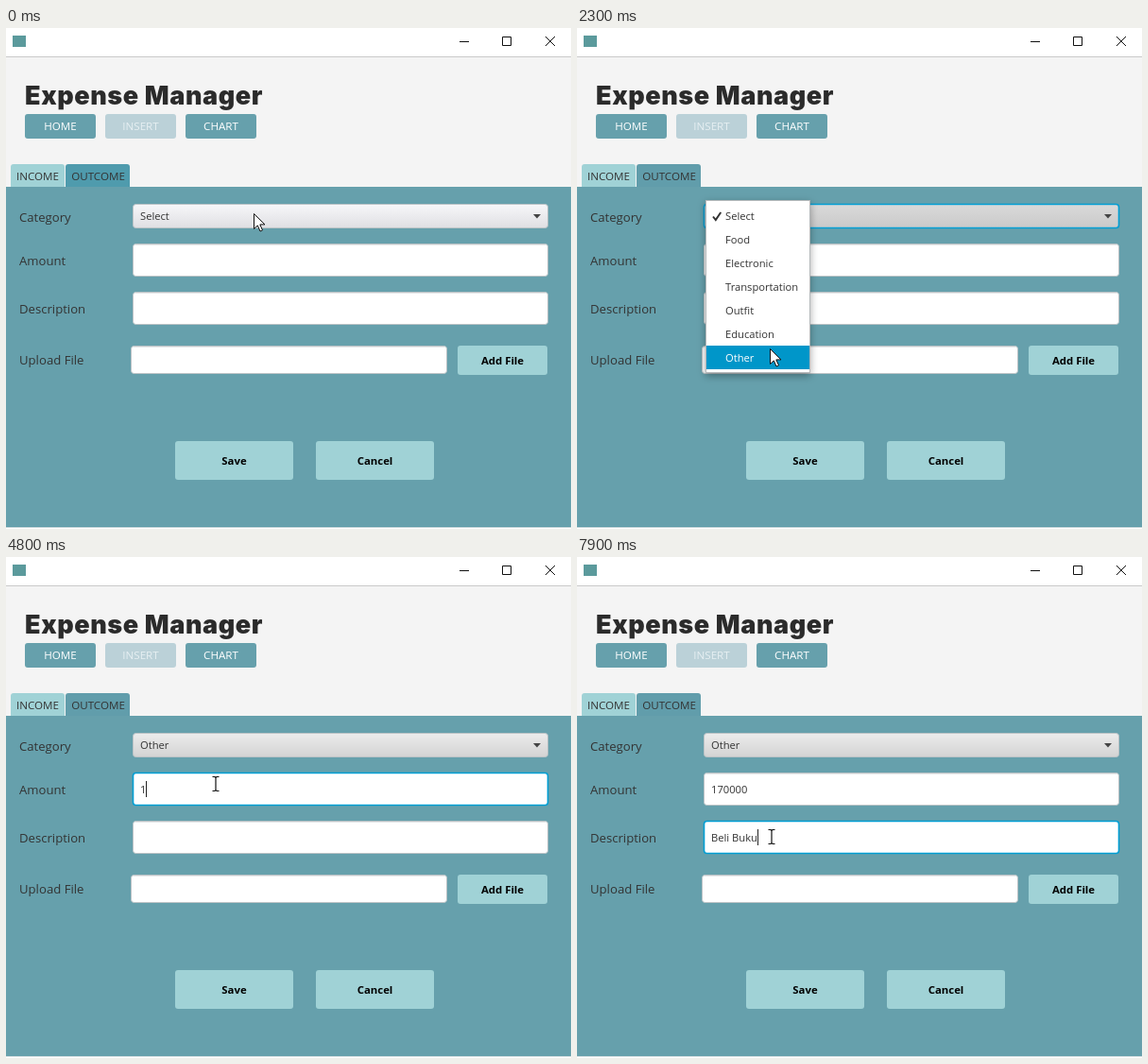
An HTML page for the animation above (8 s loop, 598 px wide and 530 px high).

```html
<!DOCTYPE html>
<html lang="en">
<head>
<meta charset="utf-8">
<title>Expense Manager</title>
<style>
  html, body { margin: 0; width: 100%; height: 100%; overflow: hidden; background: #fff; }
  svg { display: block; width: 598px; height: 530px; font-family: "Open Sans", "Noto Sans", sans-serif; fill: #333; }
  text { white-space: pre; }
  .title { font: 900 27px Inter, "Open Sans", sans-serif; font-optical-sizing: none; letter-spacing: .6px; fill: #2b2b2b; }
  .label { font-size: 13.15px; }
  .value { font-size: 11.2px; }
  .nav { font-size: 11.6px; }
  .action { font-size: 11.4px; font-weight: 700; fill: #000; }
  .mid { text-anchor: middle; }
</style>
</head>
<body>
<svg id="stage" viewBox="0 0 598 530">
  <defs>
    <linearGradient id="idle" x2="0" y2="1"><stop stop-color="#ececec"/><stop offset="1" stop-color="#d3d3d3"/></linearGradient>
    <linearGradient id="hover" x2="0" y2="1"><stop stop-color="#f7f7f9"/><stop offset="1" stop-color="#dfdfe3"/></linearGradient>
    <linearGradient id="pressed" x2="0" y2="1"><stop stop-color="#dadada"/><stop offset="1" stop-color="#c9c9c9"/></linearGradient>
    <filter id="shadow" x="-20%" y="-20%" width="140%" height="140%">
      <feDropShadow dx="0" dy="3" stdDeviation="4" flood-color="#000" flood-opacity=".35"/>
    </filter>
  </defs>
</svg>
<script>
const LOOP = 8000, STEP = 100;
const TEAL = '#66a0ac', PALE = '#a0d2d6', BLUE = '#0096c9', FOCUS = '#039ed3', EDGE = '#bcc3c6';
const CLICK = { open: 300, pick: 3500, amount: 4300, description: 6400 };
const OPTIONS = ['Select', 'Food', 'Electronic', 'Transportation', 'Outfit', 'Education', 'Other'];
const ROW_TOP = 186, ROW_HEIGHT = 25;

// Pointer stops: time, x, y
const POINTER = [
  [0, 262, 196], [700, 262, 196], [1500, 196, 344], [2000, 196, 344],
  [2800, 220, 328], [3000, 220, 328], [3400, 214, 346], [3600, 214, 346],
  [4000, 227, 250], [4400, 227, 250], [4700, 222, 240], [5700, 222, 240],
  [6300, 206, 296], [LOOP, 206, 296]
];

const stage = document.getElementById('stage');

function add(tag, attrs, parent = stage, content = '') {
  const node = document.createElementNS('http://www.w3.org/2000/svg', tag);
  set(node, attrs);
  node.textContent = content;
  return parent.appendChild(node);
}
function set(node, attrs) {
  for (const key in attrs) node.setAttribute(key, attrs[key]);
}
function show(node, visible) {
  node.setAttribute('visibility', visible ? 'visible' : 'hidden');
}
const box = (x, y, width, height, fill, rx = 0, parent = stage) =>
  add('rect', { x, y, width, height, fill, rx }, parent);
const line = (d, stroke, width = 1, parent = stage) =>
  add('path', { d, stroke, fill: 'none', 'stroke-width': width }, parent);
const label = (x, y, content, kind, parent = stage) =>
  add('text', { x, y, class: kind }, parent, content);

function button(x, y, width, height, content, kind, fill, color) {
  box(x, y, width, height, fill, 3);
  const text = label(x + width / 2, y + height / 2 + 4.2, content, kind + ' mid');
  if (color) text.style.fill = color;
}

function field(x, y, width, height) {
  const frame = box(x + .5, y + .5, width - 1, height - 1, '#fff', 3);
  const shade = line(`M${x + 3} ${y + 1.5}h${width - 6}`, '#e6e8e9');
  const text = label(x + 8, y + height / 2 + 4.5, '', 'value');
  const caret = line('', '#222');
  return { x, y, height, frame, shade, text, caret };
}

function outline(frame, focused) {
  set(frame, { stroke: focused ? FOCUS : EDGE, 'stroke-width': focused ? 1.6 : 1 });
}

// Window
box(0, 0, 598, 530, '#fff');
box(7, 8, 14, 12, '#5b9a9c');
line('M480 14.5h10M525.5 9.5h9v9h-9zM571 9l10 10M581 9l-10 10', '#111');
box(0, 30, 598, 138, '#f4f4f4');
box(0, 30, 598, 1, '#c9c9c9');
box(0, 168, 598, 360, TEAL);
box(0, 528, 598, 1, '#d5dfe1');

// Header
label(20, 81, 'Expense Manager', 'title');
button(20, 91, 75, 26, 'HOME', 'nav', TEAL, '#fff');
button(105, 91, 75, 26, 'INSERT', 'nav', '#bbd1d8', '#e6eff2');
button(190, 91, 75, 26, 'CHART', 'nav', TEAL, '#fff');
const tab = (x, width, fill) => add('path', { d: `M${x} 168v-21q0-3 3-3h${width - 6}q3 0 3 3v21z`, fill });
tab(5, 57, PALE);
const outcomeTab = tab(63, 68, TEAL);
label(33.5, 161, 'INCOME', 'nav mid');
label(97.5, 161, 'OUTCOME', 'nav mid');

// Form
['Category', 'Amount', 'Description', 'Upload File'].forEach((name, i) =>
  label(14, [205, 251, 302, 356][i], name, 'label'));
const combo = box(134.5, 186.5, 439, 25, 'url(#idle)', 3);
const choice = label(142, 203, '', 'value');
add('path', { d: 'M558 197h8l-4 4.5z', fill: '#444' });
const amount = field(134, 228, 440, 35);
const description = field(134, 279, 440, 35);
outline(field(132, 336, 335, 30).frame, false);
button(478, 336, 95, 31, 'Add File', 'action', PALE);
button(179, 437, 125, 41, 'Save', 'action', PALE);
button(328, 437, 125, 41, 'Cancel', 'action', PALE);

// Option list
const popup = add('g', {});
set(box(136.5, 182.5, 110, 182, '#fff', 0, popup), { stroke: '#b4b8ba', filter: 'url(#shadow)' });
const highlight = box(137, ROW_TOP, 109, ROW_HEIGHT, BLUE, 0, popup);
const check = line('M144 199.5l2.8 3.5 5.4-8', '#333', 2, popup);
const rows = OPTIONS.map((name, i) => label(157, ROW_TOP + ROW_HEIGHT * i + 17, name, 'value', popup));

// Pointers
const arrow = add('path', { d: 'M.5 .5v16l3.8-3.6 2.7 6.1 2.5-1.1-2.7-6h5.2z', fill: '#fff', stroke: '#111' });
const beam = add('g', {});
const beamPath = 'M-3.5-7.5h2.5l1 1 1-1h2.5M0-6.5v13M-3.5 7.5h2.5l1-1 1 1h2.5';
line(beamPath, '#fff', 2.6, beam);
line(beamPath, '#111', 1.2, beam);

function pointerAt(t) {
  const i = POINTER.findIndex(stop => stop[0] > t);
  const [t0, x0, y0] = POINTER[i - 1], [t1, x1, y1] = POINTER[i];
  const p = (t - t0) / (t1 - t0), ease = p * p * (3 - 2 * p);
  return [x0 + (x1 - x0) * ease, y0 + (y1 - y0) * ease];
}

function typed(content, start, delay, t) {
  return content.slice(0, Math.max(0, Math.floor((t - start) / delay) + 1));
}

function updateField(item, content, focused, caretOn) {
  item.text.textContent = content;
  outline(item.frame, focused);
  show(item.shade, !focused);
  show(item.caret, focused && caretOn);
  const x = Math.round(item.x + 8 + (content ? item.text.getComputedTextLength() : 0)) + .5;
  item.caret.setAttribute('d', `M${x} ${item.y + item.height / 2 - 8.5}v17`);
}

function render(t) {
  const [x, y] = pointerAt(t);
  const opened = t >= CLICK.open && t < CLICK.pick;
  const overCombo = y > 186 && y < 212;
  const inAmount = t >= CLICK.amount && t < CLICK.description;
  const inDescription = t >= CLICK.description;

  set(outcomeTab, { fill: t < CLICK.open ? '#4f9bad' : '#619dab' });
  set(combo, { fill: `url(#${opened ? 'pressed' : overCombo ? 'hover' : 'idle'})` });
  outline(combo, t >= CLICK.open && t < CLICK.amount);
  choice.textContent = t < CLICK.pick ? 'Select' : 'Other';

  show(popup, opened);
  const active = Math.max(0, Math.min(6, Math.floor((y - ROW_TOP) / ROW_HEIGHT)));
  set(highlight, { y: ROW_TOP + ROW_HEIGHT * active });
  set(check, { stroke: active ? '#333' : '#fff' });
  rows.forEach((row, i) => set(row, { fill: i === active ? '#fff' : '#333' }));

  const caretOn = t >= 7000 || t % 1000 >= 500 || (t >= 4700 && t < 5500);
  updateField(amount, typed('170000', 4700, 140, t), inAmount, caretOn);
  updateField(description, typed('Beli Buku', 6800, 110, t), inDescription, caretOn);

  const overField = !opened && ((y > 228 && y < 263) || (y > 279 && y < 314));
  const place = { transform: `translate(${Math.round(x)} ${Math.round(y)})` };
  set(arrow, place);
  set(beam, place);
  show(arrow, !overField);
  show(beam, overField);
}

const start = performance.now();
function tick() {
  const elapsed = (performance.now() - start) % LOOP;
  render(Math.floor(elapsed / STEP) * STEP);
  requestAnimationFrame(tick);
}
tick();
</script>
</body>
</html>
```
